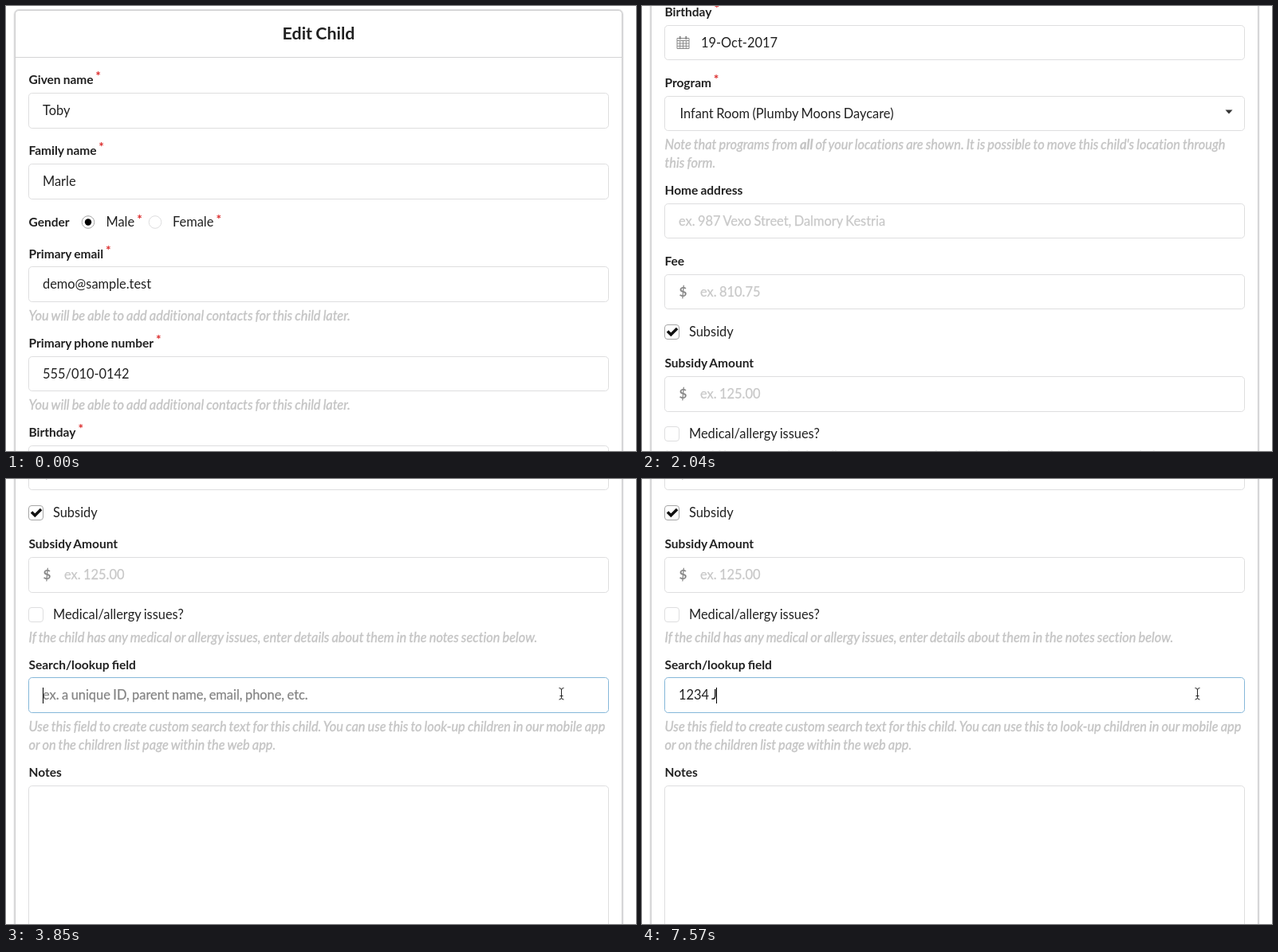
Recreate the animation shown at these times as an HTML page. Size 790 by 559 pixels, loop 7990 ms.

```html
<!DOCTYPE html>
<html lang="en">
<head>
<meta charset="utf-8">
<title>Edit Child</title>
<style>
  html, body { margin: 0; width: 100%; height: 100%; overflow: hidden; background: #fff; }
  svg { display: block; width: 790px; height: 559px; }
  text { font: 16.4px Lato, sans-serif; word-spacing: -.045em; fill: #212121; white-space: pre; }
  .title { font-size: 21.4px; font-weight: 700; text-anchor: middle; }
  .label { font-size: 15.5px; font-weight: 700; }
  .star { font-size: 15.5px; font-weight: 700; fill: #db2828; }
  .help { font-style: italic; font-variant-ligatures: none; fill: #c4c4c4; stroke: #c4c4c4; stroke-width: .35; }
  .hint { fill: #c8c8c8; stroke: #c8c8c8; stroke-width: .25; }
  .dollar { font-size: 17px; font-weight: 700; fill: #888; }
  .box { fill: #fff; stroke: #dededf; }
  .checked { stroke: #a6a6a6; }
  .icon { fill: none; stroke: #8a8a8a; }
</style>
</head>
<body>
<svg id="stage" viewBox="0 0 790 559" xmlns="http://www.w3.org/2000/svg">
  <g id="page">
    <g fill="none" stroke="#222426">
      <rect x="11.5" y="6" width="761" height="1700" rx="5" stroke-width="5" stroke-opacity=".05"/>
      <rect x="11.5" y="5.5" width="761" height="1700" rx="5" stroke-width="3" stroke-opacity=".1"/>
      <rect x="11.5" y="5.5" width="761" height="1700" rx="4.5" fill="#fff" stroke="#cfcfd0"/>
      <path d="M12 64.5H772" stroke="#d4d4d5"/>
    </g>
  </g>
  <g id="pointer">
    <path id="arrow" d="M0 0V15.5L3.6 12.2L6 17.6L8.6 16.5L6.2 11.2H11Z" fill="#000" stroke="#fff"/>
    <g id="beam" fill="none">
      <path id="beamShape" d="M-2.5 -6.5Q.5 -6.5 .5 -4V5.5Q.5 8 -2.5 8M3.5 -6.5Q.5 -6.5 .5 -4M.5 5.5Q.5 8 3.5 8M-1.5 3.5H2.5"/>
      <use href="#beamShape" stroke="#fff" stroke-width="2.6"/>
      <use href="#beamShape" stroke="#222"/>
    </g>
  </g>
</svg>
<script>
const LOOP = 7990;
const $ = id => document.getElementById(id);
const page = $('page');

function add(tag, attrs, content = '') {
  const node = document.createElementNS('http://www.w3.org/2000/svg', tag);
  for (const key in attrs) node.setAttribute(key, attrs[key]);
  node.innerHTML = content;
  page.append(node);
  return node;
}
const write = (x, y, content, cls = '') => add('text', { x, y, class: cls }, content);
const STAR = '<tspan class="star" dx="3" dy="-4.5">*</tspan>';
const label = (y, name, required) => write(28.5, y + 5.5, name + (required ? STAR : ''), 'label');
const help = (y, ...lines) => lines.forEach((line, i) => write(28.5, y + 5.5 + i * 23, line, 'help'));
const box = (x, y, w, h, r, cls = '') =>
  add('rect', { x: x + .5, y: y + .5, width: w, height: h, rx: r, class: 'box ' + cls });

// Field with its top edge at y; the text sits on a fixed baseline inside.
function field(y, content, { x = 46, cls = '', height = 44 } = {}) {
  const frame = box(28, y, 727, height, 4.2);
  return { frame, text: write(x, y + 28, content, cls) };
}
function money(y, example, height) {
  field(y, example, { x: 73, cls: 'hint', height });
  write(46.5, y + 28, '$', 'dollar');
}
function radio(x, on, name, textX) {
  add('circle', { cx: x, cy: 271.5, r: 7.8, class: on ? 'box checked' : 'box' });
  if (on) add('circle', { cx: x, cy: 271.5, r: 4.2 });
  write(textX, 277, name + STAR);
}
function checkbox(y, on, name) {
  box(28, y - 9, 18, 18, 3.5, on ? 'checked' : '');
  if (on) add('path', { d: `M32 ${y - .5}l4.3 4.3l7.8 -7.8`, fill: 'none', stroke: '#111', 'stroke-width': 3.5 });
  write(59, y + 6, name);
}

write(392, 41.5, 'Edit Child', 'title');
label(92, 'Given name', true);
field(109, 'Toby');
label(181, 'Family name', true);
field(198, 'Marle');
label(271, 'Gender');
radio(103, true, 'Male', 125.5);
radio(187, false, 'Female', 209);
label(311, 'Primary email', true);
field(327, 'demo@sample.test');
help(389, 'You will be able to add additional contacts for this child later.');
label(423, 'Primary phone number', true);
field(440, '555/010-0142', { height: 43 });
help(501, 'You will be able to add additional contacts for this child later.');
label(535, 'Birthday', true);
field(552, '19-Oct-2017', { x: 74, height: 43 });
add('path', { class: 'icon', d: 'M44 568.5h15v13h-15zM44 571.5h15M44 575h15M44 578.3h15M47.7 571.5v10M51.5 571.5v10M55.3 571.5v10' });
add('path', { class: 'icon', 'stroke-width': 2, d: 'M47.7 566v4M55.3 566v4' });
label(624, 'Program', true);
field(641, 'Infant Room (Plumby Moons Daycare)', { x: 47.5, height: 43 });
add('path', { d: 'M731.5 658.5h9l-4.5 5z', fill: '#333' });
help(702, 'Note that programs from <tspan font-weight="700">all</tspan> of your locations are shown. It is possible to move this child\'s location through', 'this form.');
label(759, 'Home address');
field(776, 'ex. 987 Vexo Street, Dalmory Kestria', { cls: 'hint', height: 43 });
label(848, 'Fee');
money(865, 'ex. 810.75', 43);
checkbox(937, true, 'Subsidy');
label(976, 'Subsidy Amount');
money(993, 'ex. 125.00', 44);
checkbox(1065, false, 'Medical/allergy issues?');
help(1094, 'If the child has any medical or allergy issues, enter details about them in the notes section below.');
label(1128, 'Search/lookup field');
const PLACEHOLDER = 'ex. a unique ID, parent name, email, phone, etc.';
const search = field(1144, PLACEHOLDER);
const caret = add('rect', { x: 46, y: 1157, width: 1, height: 20 });
help(1206, 'Use this field to create custom search text for this child. You can use this to look-up children in our mobile app', 'or on the children list page within the web app.');
label(1263, 'Notes');
field(1280, '', { height: 320 });

// Number of changes made so far, out of n spread evenly from start to end.
function stepsDone(t, start, end, n) {
  if (t < start) return 0;
  return Math.min(n, Math.floor((t - start + 5) * (n - 1) / (end - start)) + 1);
}

// Scroll knots: step, offset, speed per step.
const SCROLL = [[0, 0, 14], [6, 264, 62], [10, 528, 65], [15, 799, 39], [19, 895, 7]];
function scrollAt(step) {
  const i = Math.max(1, SCROLL.findIndex(knot => knot[0] >= step));
  const [k0, y0, v0] = SCROLL[i - 1], [k1, y1, v1] = SCROLL[i];
  const h = k1 - k0, u = (step - k0) / h, w = 1 - u;
  return Math.round(w * w * ((1 + 2 * u) * y0 + u * h * v0) + u * u * ((3 - 2 * u) * y1 - w * h * v1));
}

const TYPED = [[5350, '1'], [5590, '12'], [5770, '123'], [6010, '1234'], [6670, '1234 '], [7570, '1234 J']];
const CARET_OFF = [[0, 3790], [4270, 4750], [5230, 5350], [6550, 6670], [7210, 7570]];
const mix = (a, b, u) => a + (b - a) * u;
const blend = (from, to, u) => `rgb(${from.map((v, i) => Math.round(mix(v, to[i], u)))})`;
const show = (node, visible) => node.setAttribute('visibility', visible ? 'inherit' : 'hidden');

function drawSearch(t, focus) {
  const typed = TYPED.filter(([at]) => t >= at).map(([, s]) => s).pop() || '';
  search.text.textContent = typed || PLACEHOLDER;
  const ink = typed ? '#212121' : blend([200, 200, 200], [132, 132, 132], focus);
  search.text.style.fill = ink;
  search.text.style.stroke = typed ? 'none' : ink;
  search.text.style.strokeWidth = .25;
  search.frame.style.stroke = blend([222, 222, 223], [133, 183, 217], focus);
  const width = typed ? search.text.getComputedTextLength() : 0;
  caret.setAttribute('x', Math.floor(46 + width));
  show(caret, !CARET_OFF.some(([from, to]) => t >= from && t < to));
}

function drawPointer(step) {
  const u = Math.min(1, Math.max(0, (step - 1) / 7));
  const eased = 1 - (1 - u) ** 2;
  const x = Math.round(mix(782, 696, eased)), y = Math.round(mix(400, 269, eased));
  $('pointer').setAttribute('transform', `translate(${x} ${y})`);
  show($('arrow'), step > 0 && y > 293);
  show($('beam'), step > 0 && y <= 293);
}

function draw(t) {
  const scroll = scrollAt(stepsDone(t, 1260, 2040, 10) + stepsDone(t, 2130, 2830, 9));
  page.setAttribute('transform', `translate(0 ${-scroll})`);
  const step = stepsDone(t, 3330, 3850, 10);
  drawPointer(step);
  drawSearch(t, Math.max(0, step - 8) / 2);
}

const began = performance.now();
function tick() {
  draw((performance.now() - began) % LOOP);
  requestAnimationFrame(tick);
}
tick();
</script>
</body>
</html>
```
